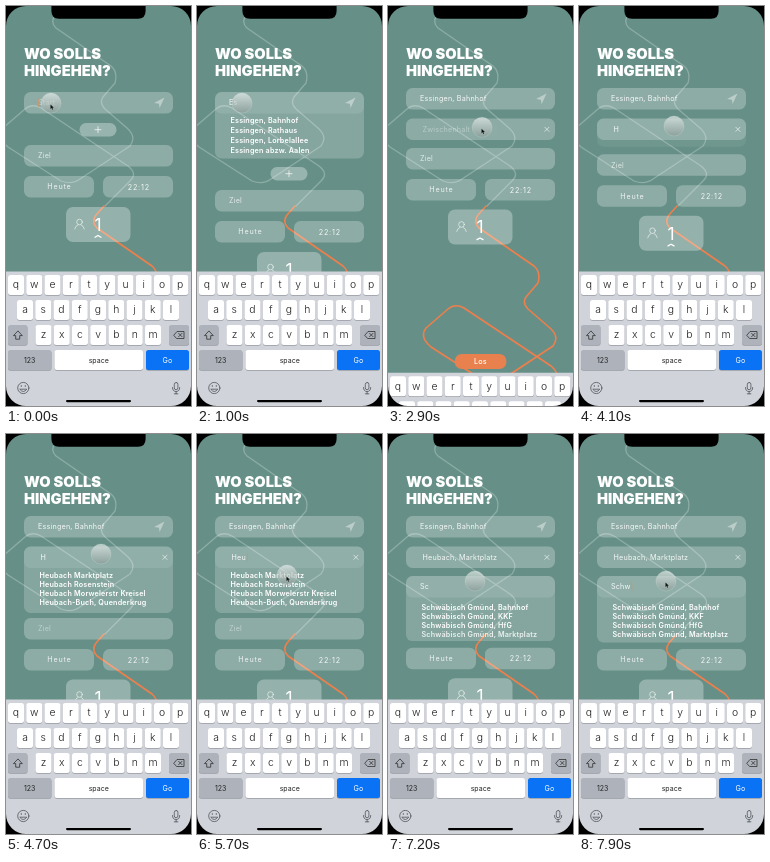
An HTML page for the animation above (8 s loop, 185x400 px).

```html
<!DOCTYPE html>
<html lang="de">
<head>
<meta charset="utf-8">
<title>Wo solls hingehen?</title>
<style>
html, body { margin: 0; width: 100%; height: 100%; overflow: hidden; background: #000; }
svg { display: block; width: 100vw; height: 100vh; }
text { font-family: Inter, Roboto, sans-serif; font-size: 7.2px; letter-spacing: .2px; fill: #fff; white-space: pre; }
.title { font-size: 14.7px; font-weight: 900; letter-spacing: 0; }
.wide { letter-spacing: .8px; }
.item { font-weight: 600; letter-spacing: .18px; }
.mid { text-anchor: middle; }
.key { fill: #222; font-size: 10.4px; font-weight: 300; letter-spacing: 0; text-anchor: middle; }
.small { font-size: 7px; font-weight: 400; }
.line { fill: none; stroke-linecap: round; stroke-linejoin: round; }
</style>
</head>
<body>
<svg viewBox="0 0 185 400">
  <defs>
    <linearGradient id="touch" x2="0" y2="1">
      <stop offset="0" stop-color="#eef3f1" stop-opacity=".65"/>
      <stop offset="1" stop-color="#8b9a96" stop-opacity=".65"/>
    </linearGradient>
    <path id="route" d="M98 200L90 209Q85 216 91 222L146 260Q153 266 150 277L138 291Q134 297 140 303L162 322Q172 331 165 340L115 373Q107 379 96 375L43 341Q31 331 38 322L60 303Q67 297 76 302L163 360Q173 368 165 375L140 400"/>
  </defs>
  <rect width="185" height="400" fill="#669087"/>
  <g class="line">
    <use href="#route" x="-41" y="-200" stroke="#fff" stroke-opacity=".25" stroke-width="1.3"/>
    <use href="#route" stroke="#ee7f4b" stroke-width="1.6"/>
  </g>
  <text class="title" x="18" y="52.6">WO SOLLS</text>
  <text class="title" x="18" y="69.7">HINGEHEN?</text>
  <g id="form"></g>
  <rect x="66.8" y="348" width="51.6" height="15" rx="7" fill="#e9814f"/>
  <text class="mid" x="92.5" y="358" font-weight="500">Los</text>
  <circle cx="88" cy="383.5" r="2.1" fill="#a9beb8"/>
  <circle cx="97.5" cy="383.5" r="2.1" fill="#34453f"/>
  <g id="keys"></g>
  <g id="pointer">
    <circle r="10" fill="url(#touch)" stroke="#fff" stroke-opacity=".25" stroke-width=".6"/>
    <path id="arrow" d="M-.5 1.5v4.6l1.1-1 .8 1.7.7-.3-.8-1.7 1.5-.1z" fill="#111"/>
  </g>
  <path d="M45.4 0H139.6V5Q139.6 12.7 132 12.7H53Q45.4 12.7 45.4 5Z"/>
  <path fill-rule="evenodd" d="M0 0H185V400H0ZM20 0A20 20 0 0 0 0 20V380A20 20 0 0 0 20 400H165A20 20 0 0 0 185 380V20A20 20 0 0 0 165 0Z"/>
</svg>
<script>
const LOOP = 8000, STEP = 100;
const $ = id => document.getElementById(id);
const smooth = u => u < .5 ? 4 * u ** 3 : 1 - 4 * (1 - u) ** 3;
const linear = u => u;

// Value of a [time, value] track at time t
function at(t, track, ease = smooth) {
  const i = track.findIndex(k => k[0] > t);
  if (i < 0) return track[track.length - 1][1];
  if (i === 0) return track[0][1];
  const [t0, a] = track[i - 1], [t1, b] = track[i];
  return a + (b - a) * ease((t - t0) / (t1 - t0));
}
// Last value whose time has come
const held = (t, track) => track.reduce((v, k) => k[0] <= t ? k[1] : v, '');
const within = (t, spans) => spans.some(([a, b]) => t >= a && t < b);

const openStart = [[300, 0], [800, 1], [1500, 1], [2000, 0]];
const openVia = [[3900, 0], [4500, 1], [5700, 1], [6200, 0]];
const openGoal = [[6800, 0], [7300, 1]];
const addVia = [[2400, 0], [3000, 1]];
const keysDrop = [[1500, 0], [1900, 135], [2800, 135], [3200, 0], [5700, 0], [6050, 135], [6300, 135], [6600, 0]];
const pointX = [[1000, 45], [1400, 46], [1900, 46], [2300, 92], [2500, 92], [3200, 95], [4800, 95], [5600, 90], [6100, 90], [6400, 87]];
const pointY = [[1000, 97], [1400, 113], [1600, 113], [1800, 110], [1900, 110], [2300, 124], [2500, 124], [3200, 120], [4800, 120], [5600, 141], [6100, 141], [6400, 147]];
const arrowOff = [[400, 1100], [4000, 4900], [6900, 7800]];
const caretOn = [[0, 200], [3200, 3800], [5500, 5800], [6400, 6700], [7800, 8000]];

const typedStart = [[400, 'E'], [1000, 'Es'], [1600, 'Essingen, Bahnhof']];
const typedVia = [[4000, 'H'], [4900, 'He'], [5300, 'Heu'], [5800, 'Heubach, Marktplatz']];
const typedGoal = [[6900, 'S'], [7200, 'Sc'], [7400, 'Sch'], [7700, 'Schw']];

const startItems = ['Essingen, Bahnhof', 'Essingen, Rathaus', 'Essingen, Lorbelallee', 'Essingen abzw. Aalen'];
const viaItems = ['Heubach Marktplatz', 'Heubach Rosenstein', 'Heubach Morwelerstr Kreisel', 'Heubach-Buch, Quenderkrug'];
const goalItems = ['Bahnhof', 'KKF', 'HfG', 'Marktplatz'].map(s => 'Schwäbisch Gmünd, ' + s);

const box = (x, y, w, h, fill, r = 6.5) =>
  `<rect x="${x}" y="${y}" width="${w}" height="${h}" rx="${r}" fill="${fill}"/>`;
const glass = a => `rgba(255,255,255,${a})`;
const label = (x, y, s, cls = '', a = 1) =>
  `<text x="${x}" y="${y}" class="${cls}" fill-opacity="${a}">${s}</text>`;

function field(f) {
  const { y, open, x = 32 } = f;
  let s = '';
  if (open > 0) {
    const fade = Math.min(1, open * 2);
    s += `<g opacity="${fade}">${box(18, y, 149, 21.5 + 45 * open, glass(.2))}</g>`;
    f.items.forEach((item, i) => {
      const a = Math.max(0, Math.min(1, open * 5 - 1 - i));
      s += label(33.5, y + f.first + i * f.pitch, item, 'item', a);
    });
  }
  s += box(18, y, 149, 21.5, glass(.25 - .15 * open));
  const caret = f.caret ? '<tspan fill="#ee7f4b" fill-opacity=".7">|</tspan>' : '';
  s += f.typed
    ? `<text x="${x}" y="${y + 13.4}" fill-opacity=".92">${f.typed}${caret}</text>`
    : label(x, y + 13.4, f.hint, '', f.dim) +
      (caret ? `<rect x="${x + .5}" y="${y + 6.5}" width="1" height="8.5" fill="#ee7f4b"/>` : '');
  return s;
}

function people(y) {
  return box(60, y, 64.5, 35, glass(.3), 7) +
    `<g transform="translate(73.5 ${y + 17})" class="line" stroke="#fff" stroke-opacity=".8" stroke-width=".7">
      <circle cy="-2" r="2.8"/><path d="M-4.8 5Q-4 1.6-1.6 .9M4.8 5Q4 1.6 1.6 .9"/></g>
    <text class="mid" x="92" y="${y + 24}" style="font-size:17.5px;letter-spacing:0">1</text>
    <path class="line" stroke="#fff" stroke-width="1.3" d="M89 ${y + 30.2}l3-1.7 3 1.7"/>`;
}

function form(t) {
  const add = at(t, addVia), o1 = at(t, openStart), o2 = at(t, openVia), o3 = at(t, openGoal);
  const caret = within(t, caretOn);
  const yStart = 86 - 4 * add, push = 45 * o1 + 42 * o2;
  const yGoal = 139 + 3 * add + push, yWhen = 170 + 3 * add + push + 42 * o3;
  let s = field({ y: yStart, open: o1, typed: held(t, typedStart), hint: 'Start', dim: .55,
    items: startItems, first: 30.6, pitch: 10.2, caret: caret && t < 1000 });
  s += `<path transform="translate(148 ${yStart + 5.5})" d="M0 5.5L10.5 0 5.6 10.6 4.9 6.2Z" fill="${glass(.4)}"/>`;
  if (add < 1) {
    const y = 117 + 44 * o1;
    s += `<g opacity="${1 - add}">${box(73.5, y, 37, 13.5, glass(.32), 6.5)}
      <path class="line" stroke="#fff" stroke-width=".7" d="M89 ${y + 6.7}h6m-3-3v6"/></g>`;
  }
  if (add > 0) {
    s += `<g opacity="${add}">` + field({ y: 112.5, x: 34.5, open: o2, typed: held(t, typedVia),
      hint: 'Zwischenhalt', dim: .4, items: viaItems, first: 31.2, pitch: 9, caret: caret && t < 6000 }) +
      `<path class="line" stroke="#fff" stroke-opacity=".85" stroke-width=".7" d="M156.8 121.2l4.2 4.2m0-4.2l-4.2 4.2"/></g>`;
  }
  s += field({ y: yGoal, open: o3, typed: held(t, typedGoal), hint: 'Ziel', dim: .75 - .3 * o2,
    items: goalItems, first: 33.6, pitch: 9, caret: caret && t > 6000 });
  s += box(18, yWhen, 70, 21.5, glass(.25)) + box(97, yWhen, 70, 21.5, glass(.25));
  s += label(53.4, yWhen + 13.4, 'Heute', 'wide mid', .85) + label(132.8, yWhen + 13.6, '22:12', 'wide mid', .92);
  return s + people(yWhen + 31 - .5 * add);
}

function keyboard() {
  const cap = (x, y, w, fill = '#fff') =>
    box(x, y + .8, w, 20, '#979ba2', 2.5) + box(x, y, w, 20, fill, 2.5);
  const row = (letters, x, y) => [...letters].map((c, i) =>
    cap(x + i * 18.25, y, 16) + label(x + i * 18.25 + 8, y + 13.3, c, 'key')).join('');
  const grey = '#adb2bb';
  return '<rect y="265.5" width="185" height="136" fill="#d0d3d9"/>' +
    row('qwertyuiop', 2, 269) + row('asdfghjkl', 11, 294) + row('zxcvbnm', 29.5, 319) +
    cap(2, 319, 19.5, grey) + cap(163, 319, 20, grey) +
    cap(2, 344, 43.5, grey) + cap(48.5, 344, 88.5) + cap(140, 344, 43, '#0a72f5') +
    label(23.7, 356.7, '123', 'key small') + label(92.7, 356.5, 'space', 'key small') +
    '<text class="mid" x="161.5" y="356.7">Go</text>' +
    `<g class="line" stroke="#222" stroke-width=".7">
      <path d="M11.7 325.2l-4.2 4.4h2.2v3.6h4v-3.6h2.2z"/>
      <path d="M168 329l3-3.5h7v7h-7zm4.6-1.7l3.4 3.4m0-3.4l-3.4 3.4"/>
    </g>
    <g class="line" stroke="#50555c" stroke-width=".8">
      <circle cx="17.3" cy="382" r="5.6"/>
      <path d="M14 383.5q3.3 4.3 6.6 0zM15.3 379.5v1M19.3 379.5v1"/>
      <rect x="168.3" y="376.5" width="3.6" height="7.2" rx="1.8"/>
      <path d="M166.5 381.5q0 4 3.6 4t3.6-4M170.1 385.5v2.3m-1.8 0h3.6"/>
    </g>` + box(60, 394, 65, 2.2, '#000', 1.1);
}

$('keys').innerHTML = keyboard();

let shown = -1;
function draw(now) {
  const t = Math.floor(now % LOOP / STEP) * STEP;
  if (t !== shown) {
    shown = t;
    $('form').innerHTML = form(t);
    $('keys').setAttribute('transform', `translate(0 ${at(t, keysDrop, linear)})`);
    $('pointer').setAttribute('transform', `translate(${at(t, pointX)} ${at(t, pointY)})`);
    $('arrow').setAttribute('opacity', within(t, arrowOff) ? 0 : 1);
  }
}
const begin = performance.now();
function tick() {
  draw(performance.now() - begin);
  requestAnimationFrame(tick);
}
tick();
</script>
</body>
</html>
```
